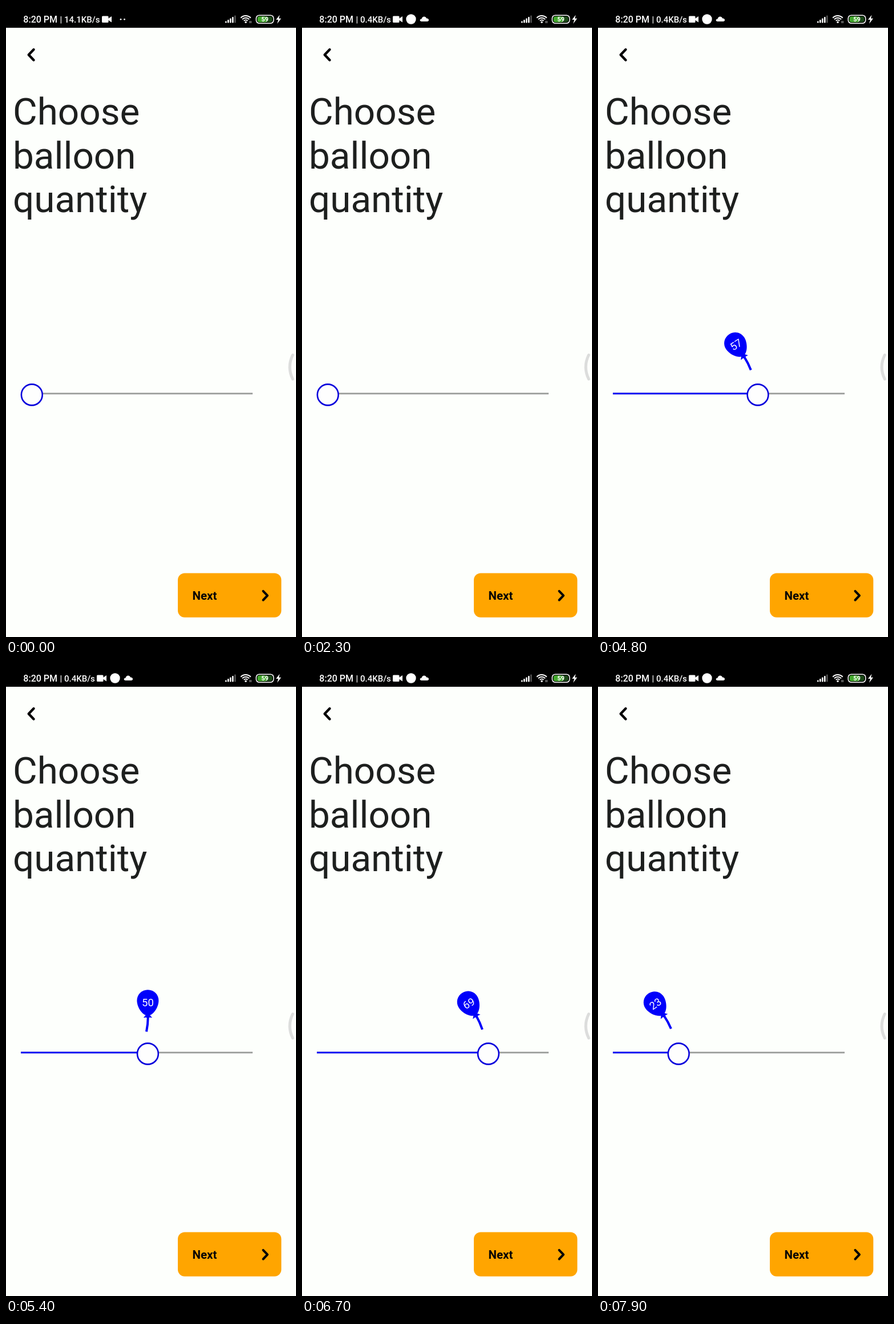
Write an HTML page with a canvas that moves like this. It is 508 by 1102 pixels and loops after 8 s.

```html
<!DOCTYPE html>
<html lang="en">
<head>
<meta charset="utf-8">
<title>Balloon slider</title>
<style>
  html, body { margin: 0; width: 100%; height: 100%; overflow: hidden; background: #fdfffc; }
  canvas { display: block; width: 508px; height: 1102px; }
</style>
</head>
<body>
<canvas id="stage" width="508" height="1102"></canvas>
<script>
const ctx = document.getElementById('stage').getContext('2d');
const LOOP = 8000, STEP = 100;
const PAN_START = 4220, STATUS_SWITCH = 1800;
const TRACK = { left: 26, right: 432, y: 676.8 };
const KNOB = { min: 45.3, range: 406, y: 679, radius: 18.4 };
const BLUE = '#0000fa', INK = '#1d1f1e', WHITE = '#ffffff';

// [time, knob x, balloon offset from the knob]
const KEYS = [
  [4220, 45.3, 0], [4400, 88, -28], [4600, 175, -35], [4800, 280, -30],
  [5000, 350, 0], [5150, 330, 24], [5300, 258, 10], [5400, 248.4, 0],
  [5550, 185, 25], [5700, 97, 28], [5900, 45.3, 0], [6050, 60, -18],
  [6300, 144, 0], [6450, 195, -26], [6600, 275, -35], [6800, 355, -10],
  [6900, 345, 14], [7100, 247.4, 32], [7300, 147, 33], [7500, 70, 22],
  [7620, 45.3, 4], [7700, 50, -14], [7900, 141.2, -32], [8000, 189, -34]
];

function slopeAt(i, col) {
  if (i === 0 || i === KEYS.length - 1) return 0;
  const rate = j => (KEYS[j + 1][col] - KEYS[j][col]) / (KEYS[j + 1][0] - KEYS[j][0]);
  const a = rate(i - 1), b = rate(i);
  return a * b <= 0 ? 0 : 2 * a * b / (a + b);
}

// Monotone cubic interpolation through KEYS
function sample(t, col) {
  if (t <= KEYS[0][0]) return KEYS[0][col];
  const i = KEYS.findIndex(key => key[0] > t) - 1;
  const [p, q] = [KEYS[i], KEYS[i + 1]];
  const span = q[0] - p[0], u = (t - p[0]) / span;
  const ease = u * u * (3 - 2 * u);
  return p[col] + (q[col] - p[col]) * ease
    + span * u * (1 - u) * ((1 - u) * slopeAt(i, col) - u * slopeAt(i + 1, col));
}

function fill(path, color) {
  ctx.fillStyle = color;
  ctx.fill(new Path2D(path));
}

function stroke(path, color, width, cap = 'round') {
  ctx.strokeStyle = color;
  ctx.lineWidth = width;
  ctx.lineCap = cap;
  ctx.lineJoin = cap === 'round' ? 'round' : 'miter';
  ctx.stroke(new Path2D(path));
}

function disc(x, y, radius, color) {
  ctx.fillStyle = color;
  ctx.beginPath();
  ctx.arc(x, y, radius, 0, Math.PI * 2);
  ctx.fill();
}

function roundBox(x, y, w, h, radius, color) {
  ctx.fillStyle = color;
  ctx.beginPath();
  ctx.roundRect(x, y, w, h, radius);
  ctx.fill();
}

function text(string, x, y, size, weight, color, align = 'left') {
  ctx.font = `${weight} ${size}px Roboto, sans-serif`;
  ctx.textAlign = align;
  ctx.fillStyle = color;
  ctx.fillText(string, x, y);
}

function drawNotifications(t) {
  const early = t < STATUS_SWITCH;
  text('8:20 PM', 30.3, 29, 16, 500, WHITE);
  text('|', 94.5, 28.5, 15, 500, WHITE);
  text(early ? '14.1KB/s' : '0.4KB/s', 102, 29, 15, 500, WHITE);

  const x = early ? 168 : 159;
  roundBox(x, 17.5, 11.5, 11.5, 1.5, WHITE);
  fill(`M${x + 11} 22 L${x + 17} 18 V28.5 L${x + 11} 24.5 Z`, WHITE);
  if (early) {
    disc(201, 23.3, 1.4, WHITE);
    disc(207.5, 23.3, 1.4, WHITE);
  } else {
    disc(191, 23, 8.7, WHITE);
    fill('M209.5 27 C205.5 27 206 22.5 209.5 22.5 C210.5 17.5 216.5 17 218 21.5 C223 21.5 223.5 27 219 27 Z', WHITE);
  }
}

function drawIndicators() {
  for (let i = 0; i < 5; i++) {
    const height = 3 + i * 2.5;
    roundBox(384 + i * 4, 29.5 - height, 2.6, height, 1, i < 4 ? WHITE : '#555');
  }

  ctx.strokeStyle = WHITE;
  ctx.lineWidth = 2;
  ctx.lineCap = 'butt';
  for (const radius of [4.5, 8.3, 12]) {
    ctx.beginPath();
    ctx.arc(420, 29, radius, -Math.PI * 0.76, -Math.PI * 0.24);
    ctx.stroke();
  }
  disc(420, 28.2, 1.7, WHITE);
  stroke('M427 26 V30 M429.2 26 V30', '#bbb', 1, 'butt');

  roundBox(437.5, 15.5, 32, 15.5, 6, WHITE);
  roundBox(439, 17, 29, 12.5, 4.8, '#000');
  roundBox(440.5, 18.3, 26, 10, 3.5, '#1c4a18');
  roundBox(440.5, 18.3, 17, 10, 3.5, '#43a92d');
  text('59', 453.5, 27.3, 11, 700, WHITE, 'center');
  fill('M479.5 15.5 L473 24 H477 L475 31 L482 21.7 H478 Z', WHITE);
}

function drawPage() {
  ctx.fillStyle = '#fdfffc';
  ctx.fillRect(0, 0, 508, 1102);
  ctx.fillStyle = '#000';
  ctx.fillRect(0, 0, 508, 38);

  stroke('M48.5 76 L39.7 85.2 L48.5 94.5', '#000', 4.4);
  ['Choose', 'balloon', 'quantity'].forEach((word, i) =>
    text(word, 12, 207 + i * 76.6, 65.6, 400, INK));
  stroke('M502.2 609.5 Q492 630.5 502.2 651.5', '#dcdddc', 5);

  roundBox(301, 990.5, 181.3, 77.3, 12, '#ffa500');
  text('Next', 326.5, 1037.3, 20.5, 700, '#050505');
  stroke('M450.5 1021.8 L458 1029.6 L450.5 1037.5', '#050505', 4);
}

function drawBalloon(t, knobX) {
  if (t < PAN_START) return;
  const p = Math.min(1, (t - PAN_START) / 300);
  const shown = p < 0.5 ? 2 * p * p : 1 - 2 * (1 - p) ** 2;
  const offset = sample(t, 2);
  const value = Math.floor((knobX - KNOB.min + 0.1) / KNOB.range * 100);

  ctx.save();
  ctx.globalAlpha = shown;
  ctx.translate(knobX + offset, KNOB.y - 75 * shown);
  ctx.rotate(Math.atan2(offset, 46));
  ctx.scale(shown, shown);
  fill('M0 -36.8 C11 -36.8 19 -28.5 19 -18 C19 -6 9 8.5 0 8.5 C-9 8.5 -19 -6 -19 -18 C-19 -28.5 -11 -36.8 0 -36.8 Z', BLUE);
  fill('M0 3 L7.6 12 L3 11.6 L0 13 L-3 11.6 L-7.6 12 Z', BLUE);
  stroke('M0.4 10 Q0.2 24 -2.4 36.3', BLUE, 4, 'butt');
  text(value, 0, -8.5, 18.4, 400, WHITE, 'center');
  ctx.restore();
}

function drawSlider(t) {
  const x = sample(t, 1);
  stroke(`M${TRACK.left} ${TRACK.y} H${TRACK.right}`, '#999b99', 2.8, 'butt');
  if (x > KNOB.min) stroke(`M${TRACK.left} ${TRACK.y} H${x}`, BLUE, 2.8, 'butt');
  drawBalloon(t, x);
  disc(x, KNOB.y, KNOB.radius, '#fefefe');
  ctx.strokeStyle = '#0800dc';
  ctx.lineWidth = 2.6;
  ctx.stroke();
}

function render(now) {
  const t = Math.floor((now % LOOP) / STEP) * STEP;
  drawPage();
  drawNotifications(t);
  drawIndicators();
  drawSlider(t);
}

function tick(now) {
  render(Math.max(0, now));
  requestAnimationFrame(tick);
}

render(0);
requestAnimationFrame(tick);
</script>
</body>
</html>
```
